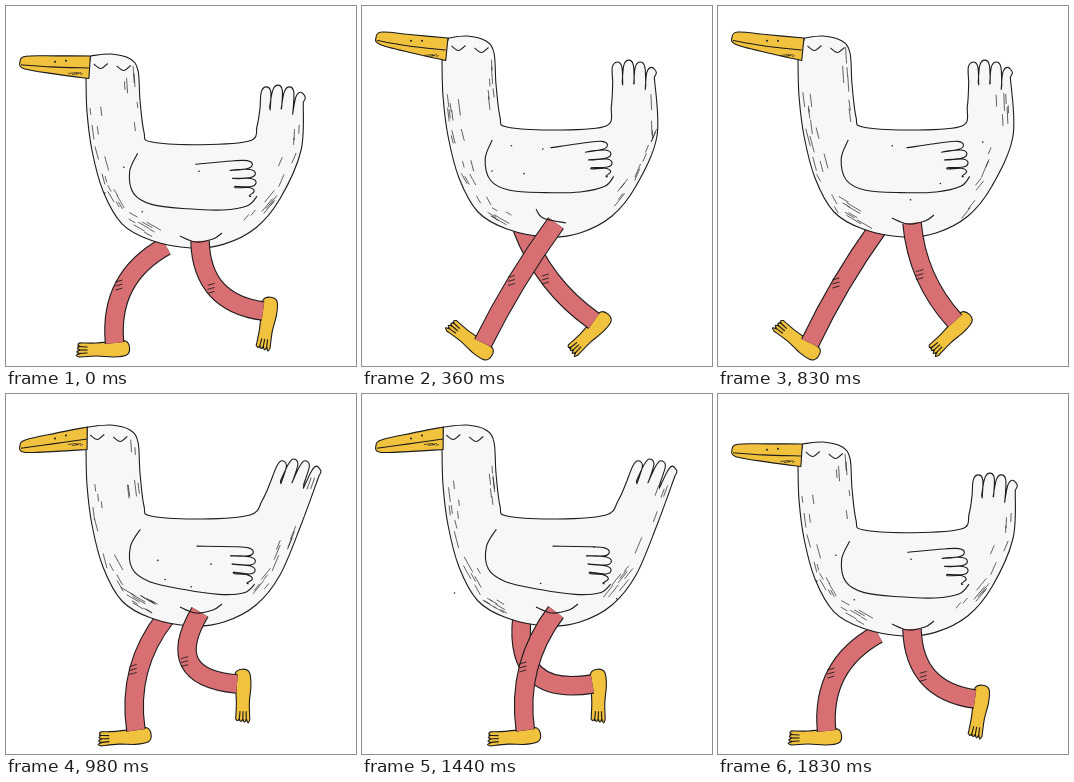
These frames come from a looping animation (350x360 px, 1900 ms). An HTML page with a canvas:

```html
<!DOCTYPE html>
<html lang="en">
<head>
<meta charset="utf-8">
<title>Walking goose</title>
<style>
html, body { margin: 0; width: 100%; height: 100%; overflow: hidden; background: #fff; }
canvas { display: block; }
</style>
</head>
<body>
<canvas id="stage" width="350" height="360"></canvas>
<script>
const ctx = document.getElementById('stage').getContext('2d');
const INK = '#1d1b1c', WHITE = '#f7f7f8', PINK = '#d76f73', YELLOW = '#f0c23e';
const LOOP = 1900, DRAWINGS = 25, STRIDE = 12;

// Height of the head over one bounce; a stride has two bounces
const BOUNCE = [48, 31, 21, 13, 9, 30];

// Key poses of a leg: step, ankle x, ankle y, foot angle, knee bend
const GAIT = [
  [0, 257, 305, -79, 20], [1, 231, 290, -88, 32], [3, 161, 302, -54, 33],
  [4, 115, 295, 28, 19], [5, 121, 337, 40, 3], [6, 142, 337, 0, 18],
  [9, 206, 335, -8, 2], [10, 193, 310, -61, 5], [11, 237, 315, -43, 9]
];

const radians = degrees => degrees * Math.PI / 180;
const wave = (step, peak, period) => Math.cos(2 * Math.PI * (step - peak) / period);

// Catmull-Rom curve, joined to the open path unless fresh
function curve(pts, fresh) {
  ctx[fresh ? 'moveTo' : 'lineTo'](...pts[0]);
  for (let i = 0; i < pts.length - 1; i++) {
    const b = pts[i], c = pts[i + 1], a = pts[i - 1] || b, d = pts[i + 2] || c;
    ctx.bezierCurveTo(b[0] + (c[0] - a[0]) / 6, b[1] + (c[1] - a[1]) / 6,
                      c[0] - (d[0] - b[0]) / 6, c[1] - (d[1] - b[1]) / 6, c[0], c[1]);
  }
}

function ink(fill, width = 1.1) {
  if (fill) { ctx.fillStyle = fill; ctx.fill(); }
  ctx.strokeStyle = INK;
  ctx.lineWidth = width;
  ctx.stroke();
}

function line(pts, width) {
  ctx.beginPath();
  curve(pts, true);
  ink(null, width);
}

function dot(x, y, r = 1) {
  ctx.fillStyle = INK;
  ctx.beginPath();
  ctx.arc(x, y, r, 0, 7);
  ctx.fill();
}

function legPose(step) {
  const j = GAIT.findLastIndex(key => key[0] <= step);
  const a = GAIT[j], b = GAIT[j + 1] || a;
  const f = (step - a[0]) / (b[0] - a[0] || 1);
  const [, x, y, angle, bend] = a.map((v, i) => v + (b[i] - v) * f);
  return { x, y, angle, bend };
}

function foot(x, y, angle) {
  ctx.save();
  ctx.translate(x, y);
  ctx.rotate(radians(angle));
  ctx.translate(7, 6);
  ctx.beginPath();
  curve([[-39, -6], [-25, -6], [-8, -7.5], [4, -8], [8, -1], [5, 6], [-8, 8], [-25, 7], [-42, 8]], true);
  for (let i = 0; i < 4; i++) {
    const ty = 6.5 - i * 3.6;
    curve([[-42, ty + 1.6], [-45.5 + i * .6, ty], [-42, ty - 1.8]]);
  }
  ctx.closePath();
  ink(YELLOW);
  for (let i = 0; i < 3; i++) line([[-44, 4.6 - i * 3.6], [-34, 4 - i * 3]]);
  ctx.restore();
}

function leg(hipX, hipY, { x, y, angle, bend }) {
  foot(x, y, angle);
  const dx = x - hipX, dy = y - hipY, len = Math.hypot(dx, dy);
  const mx = (x + hipX) / 2 - dy / len * bend, my = (y + hipY) / 2 + dx / len * bend;
  ctx.beginPath();
  ctx.moveTo(hipX, hipY);
  ctx.quadraticCurveTo(2 * mx - (x + hipX) / 2, 2 * my - (y + hipY) / 2, x, y);
  for (const [color, width] of [[INK, 19.6], [PINK, 17.4]]) {
    ctx.strokeStyle = color;
    ctx.lineWidth = width;
    ctx.stroke();
  }
  for (let i = -1; i < 2; i++) line([[mx - 9, my + i * 4], [mx - 2, my + i * 4 - 2]], .9);
}

function random(seed) {
  return () => (seed = (seed * 16807) % 2147483647) / 2147483647;
}

// Loose pen strokes inside a clockwise edge
function hatch(edge, count, rnd) {
  for (let i = 0; i < count; i++) {
    const u = rnd() * (edge.length - 1), j = Math.floor(u), f = u - j;
    const [ax, ay] = edge[j], [bx, by] = edge[j + 1];
    const len = Math.hypot(bx - ax, by - ay), dx = (bx - ax) / len, dy = (by - ay) / len;
    const inset = 3 + rnd() ** 2 * 13, size = 3 + rnd() * 6;
    const x = ax + (bx - ax) * f - dy * inset, y = ay + (by - ay) * f + dx * inset;
    line([[x - dx * size, y - dy * size], [x + dx * size, y + dy * size]], .7);
  }
}

function bill(y, drop, shift) {
  const tip = y + drop, up = y + 2, down = y + 24.5, x = 81 + shift * .5;
  ctx.beginPath();
  curve([[x + shift * .4, up], [50, (up + tip) / 2 - 3], [20, tip - 5.5], [14, tip],
         [18, tip + 7], [50, (down + tip) / 2 + 4], [x, down]], true);
  ctx.closePath();
  ink(YELLOW);
  line([[15, tip + 3], [45, (tip + y + 14) / 2 + 2], [x, y + 14]]);
  for (const nx of [49, 60]) dot(nx, tip + (up - tip) * (nx - 14) / 66 + 3);
  for (let i = 0; i < 4; i++) line([[62 + i * 4, down - 5 + i % 2], [71 + i * 2, down - 6 + i % 2]], .7);
}

function wing(y, tilt) {
  ctx.save();
  ctx.translate(130, y + 130);
  ctx.rotate(radians(tilt));
  ctx.translate(-130, -130);
  line([[133, 104], [124, 122], [127, 144], [145, 156], [180, 162], [215, 165], [240, 162], [250, 153]]);
  ctx.beginPath();
  for (let i = 0; i < 4; i++) {
    const x = 247 + 3 * Math.sin(i), ty = 121 + i * 9;
    const start = [i ? 222 + i * 2 : 190, 118 + i * 8];
    const end = i < 3 ? [224 + i * 2, 126 + i * 8] : [244, 153];
    curve([start, [x - 18, ty - 4.5], [x - 5, ty - 4], [x, ty], [x - 5, ty + 4], end], true);
  }
  ink();
  ctx.restore();
}

function body(y, step) {
  const squash = step % 6 ? 1 : .965;
  const nod = wave(step, 2, 6), sway = wave(step, 2.2, 6);
  const shift = 2 - 3.5 * nod, lean = -5.5 - 5 * sway;
  const tx = 283 + 16 * sway, ty = y + 27 + 7 * wave(step, .9, 6);
  const place = ([px, py]) => [px, y + py * squash];

  const root = [tx - 16 + lean, ty + 22];
  const front = [[81 + shift, 2], [105, 0], [124, 5], [132, 17], [134, 48], [138, 81], [145, 91],
                 [195, 94], [244, 90]].map(place);
  const rump = [[tx + 25, ty + 17], ...[[295, 100], [274, 150], [250, 180], [218, 197]].map(place)];
  const breast = [[185, 201], [145, 193], [116, 176], [97, 142], [86, 100], [81, 60], [80, 25]].map(place);

  ctx.beginPath();
  curve([...front, [(244 + root[0]) / 2 + 2, (front[8][1] + root[1]) / 2 + 2], root], true);
  for (let i = 0; i < 4; i++) {
    const px = tx - 12 + i * 11.5, py = ty + 1.8 * (i - 1) ** 2;
    const start = i ? [px - 6 + lean, py + 22] : root;
    const end = i < 3 ? [px + 6 + lean, py + 23] : rump[0];
    curve([start, [px - 5, py + 5], [px, py], [px + 4.5, py + 5], end]);
  }
  curve([...rump, ...breast]);
  ctx.closePath();
  ink(WHITE);

  const rnd = random(step * 977 + 4211);
  hatch(breast.slice(1, 6), 22, rnd);
  hatch(rump.slice(0, 4), 13, rnd);
  hatch(front.slice(3, 6), 6, rnd);
  for (let i = 0; i < 4; i++) dot(90 + rnd() * 175, y + 105 + rnd() * 70, .8);

  wing(y * 1 - (1 - squash) * 130, 6 * nod);
  bill(y, 14 + 12.5 * nod, shift);
  for (const [ex, ey] of [[84, 10], [107, 12]]) {
    line([[ex, ey], [ex + 7, ey + 4.5], [ex + 14, ey - .5]].map(([px, py]) => [px + shift, y + py]));
  }
}

function crease(hipX, hipY, forward) {
  const pts = forward ? [[-20, -14], [-13, -5], [10, 0]] : [[-20, -5], [-4, 1], [13, -2], [22, -8]];
  line(pts.map(([x, y]) => [hipX + x, hipY + y]));
}

function draw(step) {
  ctx.fillStyle = '#fff';
  ctx.fillRect(0, 0, 350, 360);
  const y = BOUNCE[step % 6], hipY = y + 187;
  const near = legPose(step), farStep = (step + 6) % STRIDE, far = legPose(farStep);
  far.x -= 17 + 17 * wave(farStep, 6.5, STRIDE);
  leg(160, hipY + 5, far);
  body(y, step);
  leg(194, hipY, near);
  crease(194, hipY, near.x < 130);
}

// Start of a drawing: steps a little shorter at first, on a 10 ms grid
const start = i => 10 * Math.round(Math.max(72 * i, 77.2 * i - 26) / 10);
const begin = performance.now();

function tick() {
  const t = (performance.now() - begin) % LOOP;
  let i = 0;
  while (i < DRAWINGS - 1 && t >= start(i + 1)) i++;
  draw(i % STRIDE);
  requestAnimationFrame(tick);
}

ctx.lineJoin = 'round';
tick();
</script>
</body>
</html>
```
